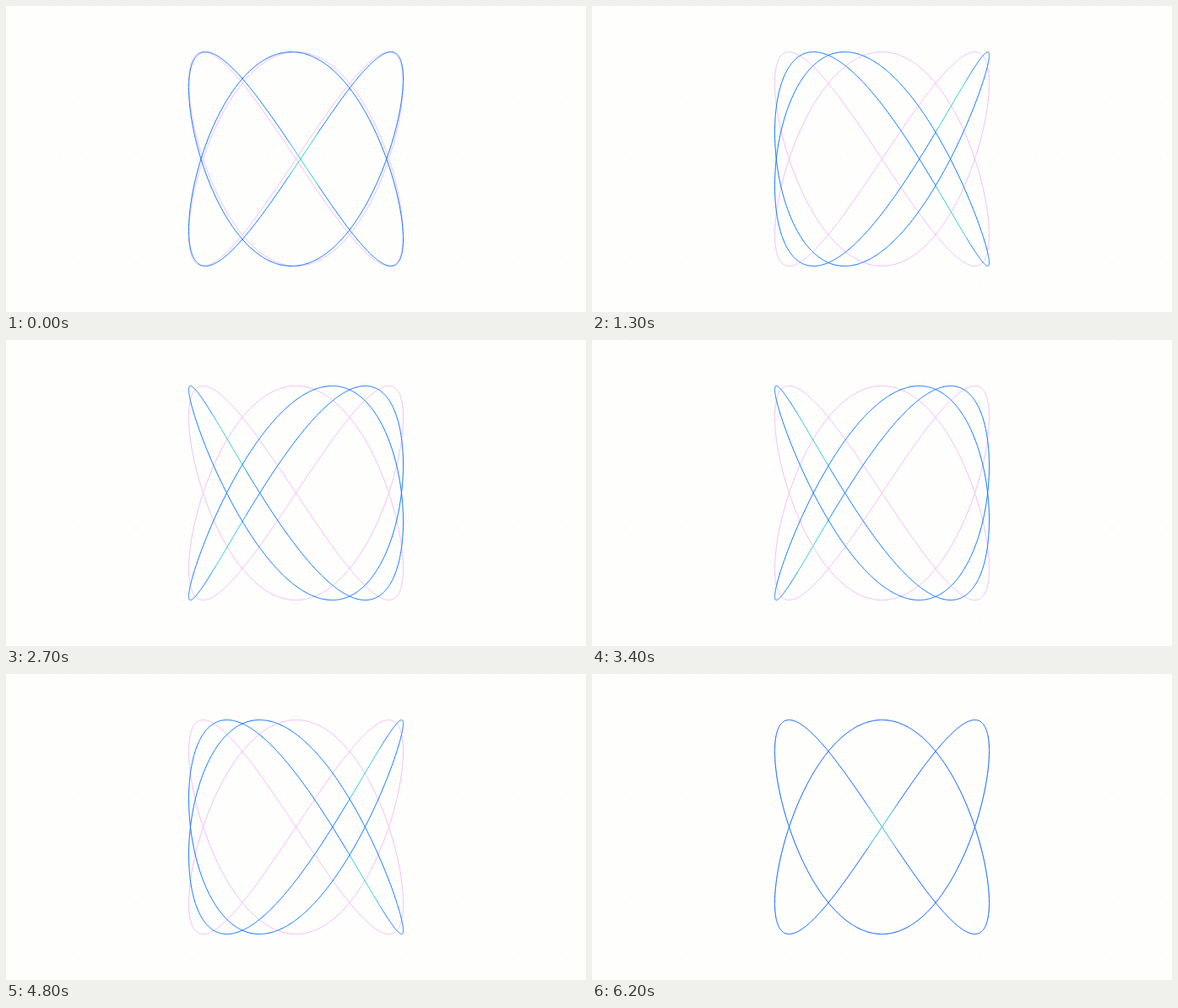
An HTML page with a canvas that plays this animation: 687x363 px, repeating every 6300 ms.

```html
<!DOCTYPE html>
<html>
<head>
<meta charset="utf-8">
<title>Lissajous curve</title>
<style>
  html, body { margin: 0; width: 100%; height: 100%; overflow: hidden; background: #fefefd; }
  canvas { display: block; }
</style>
</head>
<body>
<canvas id="stage" width="687" height="363"></canvas>
<script>
const ctx = document.getElementById('stage').getContext('2d');
const W = 687, H = 363, CX = W / 2, CY = H / 2, RADIUS = 127;
const STEP_MS = 100, STEPS = 63, PHASE_STEP = 0.05;
const GRID = 16.5, SAMPLES = 1440, LEVELS = 4;
const BLUE = [10, 116, 255], CYAN = [36, 205, 205];

const point = (t, phase) => [
  CX + RADIUS * Math.sin(2 * t + phase),
  CY - RADIUS * Math.sin(3 * t)
];

// Flat stretches, where velocity and acceleration nearly align, turn cyan.
function flatness(t, phase) {
  const a = 2 * t + phase, b = 3 * t;
  const cross = 12 * Math.sin(a) * Math.cos(b) - 18 * Math.cos(a) * Math.sin(b);
  const amount = (2.3 - Math.abs(cross)) / 0.8;
  return Math.round(Math.min(1, Math.max(0, amount)) * LEVELS);
}

const blend = level =>
  `rgb(${BLUE.map((c, i) => Math.round(c + (CYAN[i] - c) * level / LEVELS))})`;

function strokeCurve(phase, colorAt) {
  let color = null;
  for (let i = 0; i < SAMPLES; i++) {
    const t = i / SAMPLES * 2 * Math.PI, dt = 2 * Math.PI / SAMPLES;
    const next = colorAt(t + dt / 2);
    if (next !== color) {
      if (color) ctx.stroke();
      ctx.beginPath();
      ctx.moveTo(...point(t, phase));
      ctx.strokeStyle = color = next;
    }
    ctx.lineTo(...point(t + dt, phase));
  }
  ctx.stroke();
}

function drawGrid() {
  ctx.fillStyle = '#f1f1f1';
  for (let x = CX % GRID; x < W; x += GRID)
    for (let y = CY % GRID; y < H; y += GRID)
      ctx.fillRect(Math.floor(x), Math.floor(y), 1, 1);
}

function draw(now) {
  const step = Math.floor(now / STEP_MS) % STEPS;
  const phase = Math.PI + PHASE_STEP * (step - STEPS + 1);
  ctx.fillStyle = '#fefefd';
  ctx.fillRect(0, 0, W, H);
  drawGrid();
  ctx.lineWidth = 1;
  strokeCurve(0, () => '#f3bdf4');
  strokeCurve(phase, t => blend(flatness(t, phase)));
}

const start = performance.now();
function loop() {
  draw(performance.now() - start);
  requestAnimationFrame(loop);
}
loop();
</script>
</body>
</html>
```
